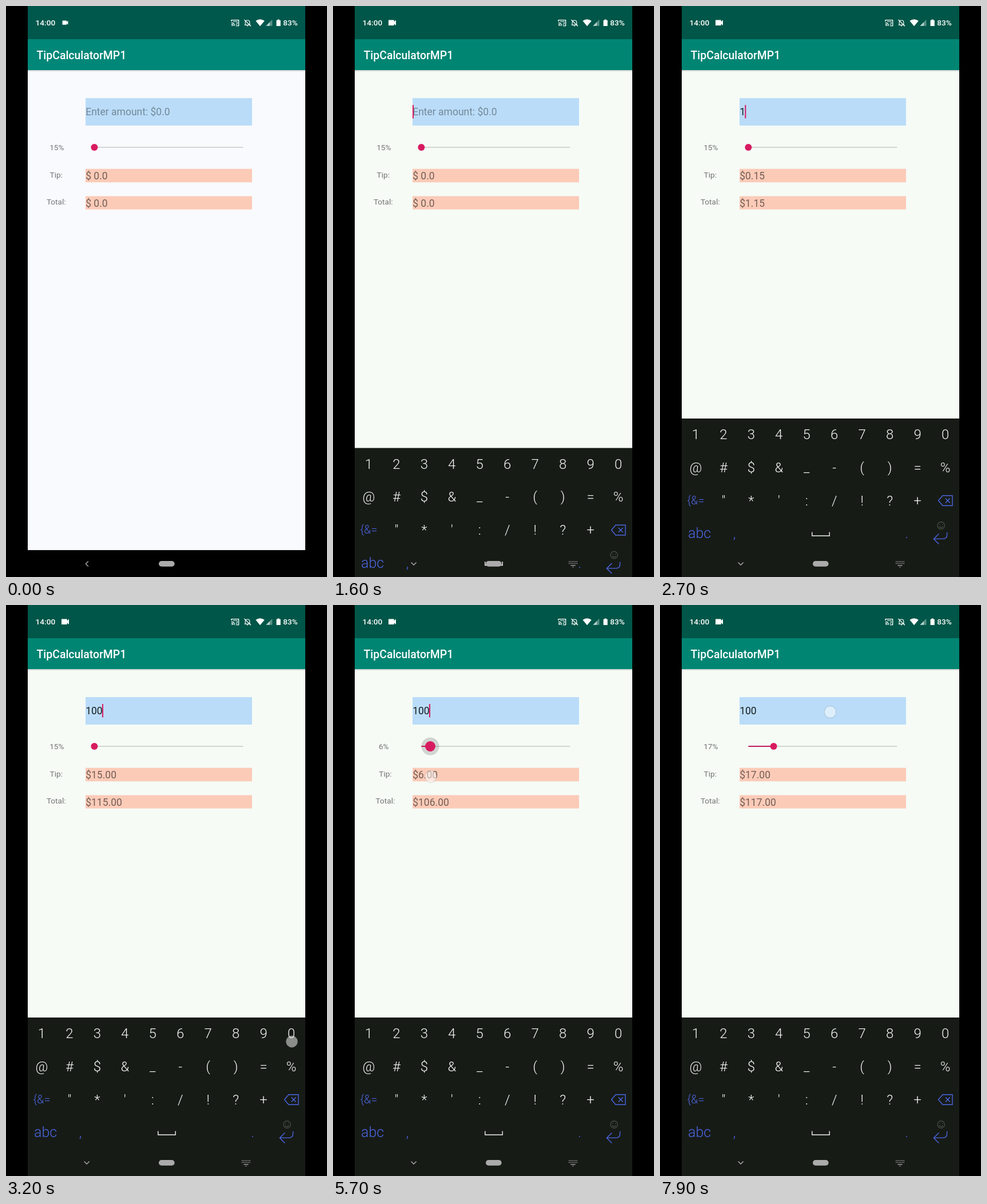
An HTML page for the animation above (8 s loop, 561 by 998 pixels).

```html
<!DOCTYPE html>
<html lang="en">
<head>
<meta charset="utf-8">
<title>Tip calculator</title>
<style>
html, body { margin: 0; width: 100%; height: 100%; overflow: hidden; background: #000; }
svg { display: block; font-family: Roboto, sans-serif; }
.label { font-size: 13.6px; fill: rgba(0,0,0,.54); }
.value { font-size: 17.5px; fill: rgba(0,0,0,.54); }
.clock { font-size: 13.6px; font-weight: 500; fill: #fff; }
.key { font-size: 24px; font-weight: 300; fill: #f4f6f4; text-anchor: middle; }
.blue { fill: #4b66e2; }
.line { fill: none; stroke-width: 1.4; }
</style>
</head>
<body>
<svg width="561" height="998" viewBox="0 0 561 998">
  <defs>
    <linearGradient id="shade" x1="0" y1="0" x2="0" y2="1">
      <stop offset="0" stop-color="#000" stop-opacity=".2"/>
      <stop offset="1" stop-color="#000" stop-opacity="0"/>
    </linearGradient>
    <clipPath id="screen"><rect x="38" width="485" height="998"/></clipPath>
  </defs>
  <rect width="561" height="998"/>
  <rect id="page" x="38" y="111" width="485" height="840"/>
  <rect id="status" x="38" width="485" height="58"/>
  <rect id="bar" x="38" y="58" width="485" height="54"/>
  <rect x="38" y="112" width="485" height="3" fill="url(#shade)"/>

  <text class="clock" x="51.6" y="34.3">14:00</text>
  <text class="clock" x="484.2" y="34.3">83%</text>
  <path id="camera" fill="#fff" d="M-6.5-4.8H3.2V-1.7L6.5-4.8V4.8L3.2 1.7V4.8H-6.5Z"/>
  <g class="line" stroke="#fff">
    <path d="M394 27V24.6H406.6V34.6H402M394 29.2A5.6 5.6 0 0 1 399.6 34.8M394 31.8A3 3 0 0 1 397 34.8"/>
    <path d="M397 27.2H404V32H401.5" stroke-width="1"/>
    <path d="M418.2 33V28.6C418.2 23.8 425.8 23.8 425.8 28.6V33M416.8 33.2H427.2M416.4 24L428 35.2" stroke-width="1.2"/>
  </g>
  <path fill="#fff" d="M420.6 34.2h2.8a1.4 1.4 0 0 1-2.8 0ZM394 33.2a1.6 1.6 0 0 1 1.6 1.6H394Z"/>
  <path fill="#fff" d="M436.4 26Q444 20.5 451.8 26L444.1 35.2Z"/>
  <path fill="#fff" opacity=".35" d="M465.4 23.8V34.8H454.4Z"/>
  <path fill="#fff" opacity=".6" d="M461 28.2V34.8H454.4Z"/>
  <path fill="#fff" d="M474.6 23.4h3v1.3h2.2v10.2h-7.2V24.7h2Z"/>
  <text x="53.6" y="92.8" font-size="19.4" font-weight="500" fill="#fff">TipCalculatorMP1</text>

  <rect x="139" y="161" width="291" height="48" fill="#badcf8"/>
  <rect x="139" y="284.6" width="291" height="23.6" fill="#fccbb8"/>
  <rect x="139" y="332.4" width="291" height="23.2" fill="#fccbb8"/>
  <text id="amount" class="value" x="139.2" y="191.4"></text>
  <rect id="caret" y="173" width="2" height="23.4" fill="#d81b60"/>
  <g id="labels" class="label">
    <text x="76.6" y="299.6">Tip:</text>
    <text x="70.9" y="346.8">Total:</text>
  </g>
  <text id="percent" class="label" x="88.8" y="252.3" text-anchor="middle"></text>
  <text id="tip" class="value" x="139.2" y="303.2"></text>
  <text id="total" class="value" x="139.2" y="350.8"></text>

  <rect x="154.4" y="246" width="260" height="2" fill="#d3d7d3"/>
  <circle id="halo" cy="247" r="15.5" fill="#000" />
  <rect id="filled" x="154.4" y="246" height="2" fill="#c2185b"/>
  <circle id="thumb" cy="247" fill="#d81b60"/>

  <g clip-path="url(#screen)">
    <g id="board">
      <rect x="38" y="721" width="485" height="277" fill="#171b16"/>
      <g id="keys"></g>
      <text class="key blue" x="62.5" y="870.5" style="font-size:20px">{&amp;=</text>
      <text class="key blue" x="69.2" y="930" style="font-size:25px">abc</text>
      <text class="key blue" x="130" y="930">,</text>
      <text class="key blue" x="431" y="930">.</text>
      <g class="line" stroke="#4b66e2">
        <path d="M486.6 864.5L494 855.8H511V873.2H494ZM498.8 860.5L506.8 868.5M506.8 860.5L498.8 868.5"/>
        <path d="M501.6 920V924Q501.6 931.4 494 931.4H478.6M487.4 922.4L478.4 931.4L487.4 940.4"/>
      </g>
      <path class="line" stroke="#f0f2f0" d="M265.8 919.5V926H296.2V919.5"/>
      <g class="line" stroke="#444943" stroke-width="1">
        <circle cx="491.2" cy="908" r="6.2"/>
        <path d="M488 909.5Q491.2 914 494.4 909.5M488.8 905.4v1.6M493.6 905.4v1.6"/>
      </g>
    </g>
  </g>

  <rect x="267" y="970" width="27.6" height="9.8" rx="4.9" fill="#ababab"/>
  <path id="back" class="line" stroke="#aaa"/>
  <g id="ime" fill="#999">
    <path d="M415.4 977H423.6V978.4H415.4ZM417.8 980H421.2L419.5 981.6Z"/>
  </g>
  <circle id="touch" r="10.4" fill="#fff" fill-opacity=".5" stroke="#000" stroke-opacity=".17"/>
</svg>
<script>
const NS = "http://www.w3.org/2000/svg";
const LOOP = 8000;
const $ = id => document.getElementById(id);
const set = (id, attrs) => { for (const k in attrs) $(id).setAttribute(k, attrs[k]); };
const show = (id, on) => set(id, { visibility: on ? "visible" : "hidden" });
const ramp = (t, a, b) => Math.min(1, Math.max(0, (t - a) / (b - a)));
const lerp = (a, b, k) => a + (b - a) * k;
const mix = (a, b, k) => `rgb(${a.map((v, i) => Math.round(lerp(v, b[i], k)))})`;
const money = v => "$" + v.toFixed(2);

function add(parent, tag, attrs, text = "") {
  const el = document.createElementNS(NS, tag);
  for (const k in attrs) el.setAttribute(k, attrs[k]);
  el.textContent = text;
  $(parent).append(el);
}

// points are [time, value, value...]
function follow(points, t) {
  let i = 1;
  while (i < points.length - 1 && t > points[i][0]) i++;
  const [a, b] = [points[i - 1], points[i]];
  const k = ramp(t, a[0], b[0]);
  return a.slice(1).map((v, j) => lerp(v, b[j + 1], k));
}

["1234567890", "@#$&_-()=%", " \"*':/!?+"].forEach((row, r) =>
  [...row].forEach((c, i) => {
    if (c !== " ") add("keys", "text", { class: "key", x: 62.4 + 48.46 * i, y: 757 + 57.8 * r }, c);
  }));
for (let r = 0; r < 2; r++)
  for (let i = 0; i < 6; i++)
    add("ime", "rect", { x: 412 + 2.7 * i, y: 970.4 + 3.2 * r, width: 1.5, height: 1.5 });

const taps = [
  [1300, 1590, 354, 186.5],
  [2500, 2690, 63, 762],
  [2790, 2990, 499, 762],
  [3090, 3290, 499.5, 763],
  [7890, LOOP, 297.5, 187]
];
// finger on the slider: percent and height
const drag = [[5000, 0, 252], [5250, 0.6, 270], [5700, 6, 300], [6200, 12, 305], [6650, 17, 307]];
const typed = t => t < 2590 ? "" : t < 2890 ? "1" : t < 3190 ? "10" : "100";

function caretOn(t) {
  if (t < 1480) return false;
  if (t < 2480) return t < 1990;
  if (t < 3190) return true;
  if (t < 4240) return t < 3690;
  return (t - 4240) % 1010 < 520;
}

function draw(t) {
  const warm = Math.min(4, Math.floor(t / 100)) / 4;
  set("page", { fill: mix([249, 250, 253], [246, 251, 246], warm) });
  set("status", { fill: mix([0, 88, 76], [0, 86, 72], warm) });
  set("bar", { fill: mix([0, 135, 120], [0, 133, 115], warm) });
  set("camera", { transform: `translate(103.5 29.2) scale(${lerp(0.76, 1, warm)})` });

  const text = typed(t);
  $("amount").textContent = text || "Enter amount: $0.0";
  $("amount").style.fill = `rgba(0,0,0,${text ? 0.87 : 0.38})`;
  set("caret", { x: 139 + text.length * 9.83 - (text ? 0.5 : 0) });
  show("caret", caretOn(t));

  const [pos, fingerY] = follow(drag, t);
  const p = Math.round(pos);
  const rate = t < 5090 ? 15 : p;
  $("percent").textContent = rate + "%";
  set("labels", { transform: `translate(${rate < 10 ? 3.7 : 0} 0)` });
  $("tip").textContent = text ? money(text * rate / 100) : "$ 0.0";
  $("total").textContent = text ? money(text * (1 + rate / 100)) : "$ 0.0";

  const x = 154.4 + 2.6 * p;
  const press = ramp(t, 4980, 5150) * (1 - ramp(t, 6740, 6890));
  set("thumb", { cx: x, r: lerp(6, 9, press) });
  set("halo", { cx: x, opacity: 0.15 * press });
  set("filled", { width: x - 154.4 });

  const slide = 1 - (1 - ramp(t, 1510, 1670)) ** 2;
  set("board", { transform: `translate(0 ${277 * (1 - slide)})` });
  show("board", slide > 0);
  const ime = t >= 1480;
  show("ime", ime);
  set("back", { d: ime ? "M136.6 972.4l4.5 4.5 4.5-4.5" : "M143.8 970.5l-4.5 4.5 4.5 4.5" });

  const tap = taps.find(([a, b]) => t >= a && t < b);
  const dragging = t >= 4980 && t < 6780;
  show("touch", tap || dragging);
  if (tap) set("touch", { cx: tap[2], cy: tap[3] });
  else if (dragging) set("touch", { cx: 155.1 + 2.6 * pos, cy: fingerY });
}

function tick() {
  draw(performance.now() % LOOP);
  requestAnimationFrame(tick);
}
tick();
</script>
</body>
</html>
```
